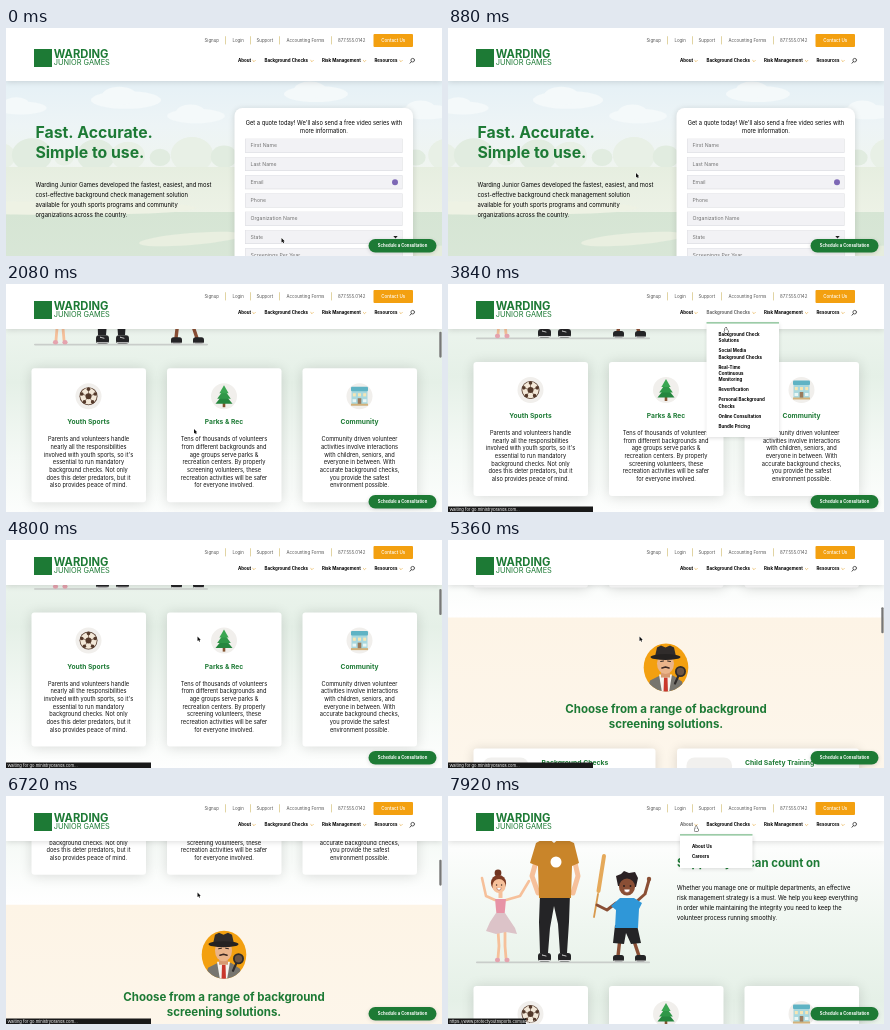
An HTML page with a canvas for the animation above (8 s loop, 436 px wide and 228 px high).

```html
<!DOCTYPE html>
<html lang="en">
<head>
<meta charset="utf-8">
<title>Page tour</title>
<style>
html, body { margin: 0; width: 100%; height: 100%; overflow: hidden; background: #fff; }
canvas { display: block; width: 436px; height: 228px; }
</style>
</head>
<body>
<canvas id="stage"></canvas>
<script>
const W = 436, H = 228, LOOP = 8000, STEP = 80;
const GREEN = '#1d7a35', ORANGE = '#f3a010', INK = '#000', SKIN = '#f6c09a', BROWN = '#8a4f35', BLACK = '#242426';
const canvas = document.getElementById('stage');
const c = canvas.getContext('2d');
const dpr = window.devicePixelRatio || 1;
canvas.width = W * dpr;
canvas.height = H * dpr;

// ---- drawing helpers ----
function fill(color, shadow) {
  c.save();
  if (shadow) {
    c.shadowColor = 'rgba(0,0,0,.14)';
    c.shadowBlur = shadow * dpr;
    c.shadowOffsetY = dpr;
  }
  c.fillStyle = color;
  c.fill();
  c.restore();
}
function box(x, y, w, h, color, r = 0, shadow = 0) {
  c.beginPath();
  c.roundRect(x, y, w, h, r);
  fill(color, shadow);
}
function oval(x, y, rx, ry, color, turn = 0) {
  c.beginPath();
  c.ellipse(x, y, rx, ry, turn, 0, 7);
  fill(color);
}
const disc = (x, y, r, color) => oval(x, y, r, r, color);
function trace(p) {
  c.beginPath();
  for (let i = 0; i < p.length; i += 2) c.lineTo(p[i], p[i + 1]);
}
function poly(color, ...p) {
  trace(p);
  c.closePath();
  fill(color);
}
function line(color, width, ...p) {
  trace(p);
  c.strokeStyle = color;
  c.lineWidth = width;
  c.lineCap = c.lineJoin = 'round';
  c.stroke();
}
function ring(x, y, r, color, width, from = 0, to = 7) {
  c.beginPath();
  c.arc(x, y, r, from, to);
  c.strokeStyle = color;
  c.lineWidth = width;
  c.stroke();
}
function grin(x, y, r) {
  c.beginPath();
  c.arc(x, y, r, 0, Math.PI);
  fill('#fff');
  ring(x, y, r, '#8d4030', 0.5, 0, Math.PI);
}
function text(s, x, y, size, color = INK, weight = 400, align = 'left') {
  c.font = `${weight} ${size}px Inter, sans-serif`;
  c.textAlign = align;
  c.fillStyle = color;
  c.fillText(s, x, y + size * 0.33);
}
function lines(s, x, y, step, size, color, weight, align) {
  s.split('|').forEach((row, i) => text(row, x, y + i * step, size, color, weight, align));
}
function fade(y0, y1, ...colors) {
  const g = c.createLinearGradient(0, y0, 0, y1);
  colors.forEach((k, i) => g.addColorStop(i / (colors.length - 1), k));
  return g;
}

// ---- timing helpers ----
const ease = (t, a, b) => {
  const u = Math.min(1, Math.max(0, (t - a) / (b - a)));
  return u * u * (3 - 2 * u);
};
const scrollAt = t => 420 * ease(t, 920, 2170) + 329 * ease(t, 4700, 6020) - 441 * ease(t, 6350, 7150);
const moves = [[100, 760, 188, 145], [2500, 3300, 278, 46], [4250, 4680, 191.5, 96.5], [7150, 7600, 248.2, 32.5]];
function cursorAt(t) {
  let x = 275.5, y = 210;
  for (const [a, b, nx, ny] of moves) {
    const u = ease(t, a, b);
    x += (nx - x) * u;
    y += (ny - y) * u;
  }
  return [x, y];
}

// ---- page sections, in page coordinates ----
function hero() {
  box(0, 0, W, 287, fade(45, 150, '#e4f0f6', '#edf4f6', '#f0f5ee'));
  for (const [x, y, r] of [[15, 80, 16], [120, 72, 22], [190, 88, 18], [310, 66, 20], [420, 84, 18]]) {
    oval(x, y, r * 1.6, r * 0.4, '#f4f9fa');
    oval(x - r * 0.3, y - 4, r * 0.8, r * 0.42, '#f4f9fa');
  }
  for (let i = 0; i < 15; i++) {
    const x = i * 32 - 6, r = 13 + 5 * Math.sin(i * 2.3);
    oval(x, 132 - r * 0.3, r * 1.2, r, i % 2 ? '#e1ece0' : '#e8f0e6');
  }
  box(0, 139, W, 46, fade(139, 185, '#e6eee0', '#edf2e6'));
  box(0, 184, W, 103, fade(184, 287, '#d6e5d4', '#dbe8da'));
  oval(60, 180, 130, 7, '#eef2e4');
  oval(185, 211, 52, 6, '#e9efe0', -0.08);
  oval(400, 226, 90, 9, '#e6eddd');
  oval(20, 240, 110, 10, '#d2e3d1');
  c.beginPath();
  c.moveTo(0, 267);
  c.bezierCurveTo(90, 276, 170, 277, 240, 272);
  c.bezierCurveTo(310, 264, 380, 268, W, 260);
  c.lineTo(W, 287);
  c.lineTo(0, 287);
  fill('#f3ede0');

  lines('Fast. Accurate.|Simple to use.', 29.5, 105.2, 20, 15.8, GREEN, 700);
  lines('Warding Junior Games developed the fastest, easiest, and most|cost-effective background check management solution|available for youth sports programs and community|organizations across the country.', 29.5, 157.2, 9.8, 5.85);

  box(228.5, 80, 178.5, 181, '#fff', 8, 6);
  lines("Get a quote today! We'll also send a free video series with|more information.", 318, 95.5, 8, 5.73, INK, 400, 'center');
  ['First Name', 'Last Name', 'Email', 'Phone', 'Organization Name', 'State', 'Screenings Per Year'].forEach((s, i) => {
    const y = 117.7 + i * 18.25;
    box(239, y - 7, 157.5, 14, '#d6d7dc');
    box(239.4, y - 6.6, 156.7, 13.2, '#f2f2f5');
    text(s, 244.5, y, 5.2, '#757575');
  });
  disc(389, 154.2, 3, '#7d68b5');
  poly('#222', 387.3, 208, 391.7, 208, 389.5, 210.6);
  box(239, 238.5, 27, 13, ORANGE, 1);
  text('Submit', 252.5, 245, 5.2, '#fff', 400, 'center');
}

function dancer() {
  line(SKIN, 2.8, 50, 134, 51, 150, 50, 162);
  line(SKIN, 2.8, 57, 134, 57, 150, 58, 162);
  oval(49.5, 164, 2.6, 2.2, '#e5a3ae');
  oval(59, 164, 2.6, 2.2, '#e5a3ae');
  line(SKIN, 2.6, 47, 104, 38, 100, 34, 82);
  line(SKIN, 2.6, 58, 104, 72, 100, 81, 85);
  disc(50, 77, 3.4, '#6f3420');
  oval(50.5, 87, 7.6, 8, '#7d3b24');
  oval(51, 90, 6.6, 7, SKIN);
  grin(51, 92, 2.2);
  disc(48.6, 89, 0.7, '#3b2b26');
  disc(53.6, 89, 0.7, '#3b2b26');
  box(50.5, 96, 4, 6, SKIN);
  poly('#e793a6', 47, 103, 58, 103, 56.5, 119, 48.5, 119);
  poly('#dcc3c8', 48, 117, 57, 117, 67, 132, 69, 138, 58, 136, 48, 138, 38, 135, 42, 126);
}

function coach() {
  line(SKIN, 5, 89, 62, 84, 80, 90, 97);
  line(SKIN, 5, 126, 62, 130, 80, 125, 97);
  poly(BLACK, 92, 98, 122, 98, 121, 126, 119, 157, 112, 157, 110, 128, 106, 110, 102, 132, 100, 157, 92, 157, 91, 126);
  for (const x of [90, 110]) {
    box(x, 157, 13, 8.5, BLACK, 3);
    line('#eee', 1, x + 1, 164.6, x + 12, 164.6);
    line('#eee', 0.8, x + 4, 159, x + 8, 160);
  }
  box(100, 34, 12, 12, '#e6a67f');
  poly('#c9852a', 97, 42, 115, 42, 126, 47, 131, 67, 124, 70, 123, 102, 91, 102, 90, 70, 82, 67, 88, 47);
  poly('#fff', 100, 42, 112, 42, 106, 47);
  disc(108, 66, 5.5, '#fff');
  oval(107, 22, 11.3, 15.5, SKIN);
  disc(95.5, 24, 2.6, SKIN);
  disc(118.5, 23, 2.6, SKIN);
  poly('#74371a', 95.5, 22, 94, 11, 97, 6, 104, 4, 114, 5, 119, 10, 119, 19, 116, 14, 108, 14, 100, 12, 97.5, 15);
  disc(103, 21, 1.2, '#3b2520');
  disc(112, 21, 1.2, '#3b2520');
  line('#74371a', 0.9, 101, 18, 105, 17.5);
  line('#74371a', 0.9, 110, 17.5, 114, 18);
  grin(108, 27, 4.6);
}

function batter() {
  line('#d89a4e', 1.8, 146, 121, 150, 98);
  line('#e5a95a', 4, 150.5, 95, 156, 60);
  line(BROWN, 3, 168, 107, 159, 114, 149, 109);
  line(BROWN, 3, 188, 106, 197, 98, 201, 84);
  disc(201, 83, 2.2, BROWN);
  line(BROWN, 3.4, 172, 142, 170, 160);
  line(BROWN, 3.4, 185, 142, 191, 160);
  for (const x of [165, 187]) {
    box(x, 159, 11, 6.5, BLACK, 2.5);
    line('#eee', 0.9, x + 1, 165, x + 10, 165);
  }
  poly(BLACK, 167, 129, 189, 129, 193, 147, 183, 148, 178, 137, 176, 148, 165, 147);
  poly('#2f97d8', 172, 102, 186, 102, 194, 107, 191, 113, 190, 132, 167, 132, 168, 114, 163, 110);
  poly('#2b2224', 170, 90, 168, 80, 173, 78, 176, 75, 181, 77, 187, 76, 190, 82, 188, 91);
  oval(179, 91, 8, 8.6, BROWN);
  disc(176, 90, 0.9, '#221a1a');
  disc(182.5, 90, 0.9, '#221a1a');
  grin(179, 93.5, 3);
}

function ball(x, y) {
  disc(x, y, 9, '#54392a');
  disc(x, y, 8.2, '#f3e8d8');
  disc(x, y, 3, '#54392a');
  for (let i = 0; i < 5; i++) {
    const a = i * 1.2566 - 1.57, u = Math.cos(a), v = Math.sin(a);
    line('#54392a', 0.6, x, y, x + u * 7, y + v * 7);
    disc(x + u * 7, y + v * 7, 1.8, '#54392a');
  }
}
function tree(x, y) {
  box(x - 1.3, y + 6, 2.6, 5, '#83532f');
  poly('#25863e', x, y - 3, x + 8.5, y + 7.5, x - 8.5, y + 7.5);
  poly('#2f9748', x, y - 7, x + 6.8, y + 2.5, x - 6.8, y + 2.5);
  poly('#3aa652', x, y - 11, x + 4.6, y - 3, x - 4.6, y - 3);
}
function hall(x, y) {
  box(x - 8, y - 7, 16, 16, '#a9d8de', 1);
  box(x - 8.5, y - 9.5, 17, 4.5, '#5fb3c4', 1);
  box(x - 8.5, y + 7.5, 17, 2, '#d3b27a');
  for (const d of [-5.2, 0, 5.2]) box(x + d - 1.5, y - 3, 3, 3.2, '#f6e6b4');
  box(x - 1.8, y + 2, 3.6, 5.6, '#9a7a5c');
  box(x - 7, y + 3, 3.6, 3, '#e9f6f5');
  box(x + 3.4, y + 3, 3.6, 3, '#e9f6f5');
}

function support() {
  box(0, 287, W, 375, fade(287, 662, '#fff', '#fcfdfc', '#eff6f0', '#e5f0e7', '#f4f9f5', '#fff'));
  c.save();
  c.translate(0, 308);
  box(28, 165.6, 174, 1.6, '#c9cdca', 0.8);
  dancer();
  coach();
  batter();
  c.restore();
  text('Support you can count on', 229, 375, 11.4, GREEN, 700);
  lines('Whether you manage one or multiple departments, an effective|risk management strategy is a must. We help you keep everything|in order while maintaining the integrity you need to keep the|volunteer process running smoothly.', 229, 400.5, 9.7, 5.82);
  const cards = [
    ['Youth Sports', ball, "Parents and volunteers handle|nearly all the responsibilities|involved with youth sports, so it's|essential to run mandatory|background checks. Not only|does this deter predators, but it|also provides peace of mind."],
    ['Parks & Rec', tree, 'Tens of thousands of volunteers|from different backgrounds and|age groups serve parks &|recreation centers. By properly|screening volunteers, these|recreation activities will be safer|for everyone involved.'],
    ['Community', hall, 'Community driven volunteer|activities involve interactions|with children, seniors, and|everyone in between. With|accurate background checks,|you provide the safest|environment possible.']
  ];
  cards.forEach(([title, icon, body], i) => {
    const x = 25.5 + i * 135.5, mid = x + 57;
    box(x, 498, 114.5, 134, '#fff', 3, 13);
    disc(mid, 526, 13, '#f1efec');
    icon(mid, 526);
    text(title, mid, 552, 6.7, GREEN, 700, 'center');
    lines(body, mid, 569.3, 7.65, 5.68, '#111', 400, 'center');
  });
}

function detective() {
  c.save();
  c.beginPath();
  c.ellipse(218, 712, 22.3, 24, 0, 0, 7);
  fill(ORANGE);
  c.clip();
  poly('#77756f', 198, 740, 202, 725, 212, 720, 225, 720, 234, 726, 238, 740);
  poly('#f5f3ee', 211, 719, 224, 719, 221, 737, 214, 737);
  poly('#c9372c', 216, 722, 219.5, 722, 220, 738, 215.5, 738);
  box(213, 714, 9, 8, '#d79a70');
  oval(217.5, 708, 8.5, 10.5, '#eab48a');
  line('#2b2320', 1, 212.5, 706, 215.5, 705.5);
  line('#2b2320', 1, 219.5, 705.5, 222.5, 706);
  line('#3a2823', 1.6, 214, 712.5, 217.5, 711.5, 221, 712.5);
  poly('#302c2b', 207, 701, 209, 692, 213, 690, 217.5, 692, 222, 690, 226, 692, 228, 701);
  oval(217.5, 701.5, 15, 3, '#252221');
  c.restore();
  line('#302c2b', 2.2, 231, 719, 227, 728);
  disc(232.5, 716, 5.5, '#302c2b');
  disc(232.5, 716, 3.7, '#6b5544');
}
function magnifier(x, y) {
  box(x - 11, y - 17, 24, 31, '#fff', 1);
  for (let i = 0; i < 5; i++) line('#c6c6c6', 1.2, x - 7, y - 11 + i * 5, x + 8, y - 11 + i * 5);
  line('#2f3a38', 4, x + 8, y + 7, x + 20, y + 15);
  disc(x - 2, y - 3, 12, 'rgba(226,236,234,.85)');
  ring(x - 2, y - 3, 12, '#2f3a38', 2.2);
  for (let i = 0; i < 3; i++) line('#aebbb6', 1.3, x - 8, y - 8 + i * 5, x + 4, y - 8 + i * 5);
}
function training(x, y) {
  box(x - 10, y - 12, 17, 16, GREEN, 1);
  poly(GREEN, x - 4, y + 3, x + 2, y + 3, x - 1, y + 8);
  text('i', x - 1.5, y - 4, 13, '#fff', 700, 'center');
  disc(x - 11, y + 4, 5.2, ORANGE);
  text('?', x - 11, y + 4, 7, '#fff', 700, 'center');
  box(x + 2, y - 0.5, 10, 8.5, ORANGE, 3);
  poly(ORANGE, x + 4, y + 7, x + 9, y + 7, x + 6, y + 10);
  text('★', x + 7, y + 4, 5.5, '#fff', 700, 'center');
}
function clock(x, y) {
  disc(x, y, 14.5, '#fff');
  disc(x, y, 13.3, '#1f8440');
  line('#fff', 1.8, x, y - 8, x, y, x + 5.5, y + 5);
}
function dots(x, y) {
  for (const u of [-7, 7.5]) for (const v of [-7, 8]) disc(x + u, y + v, 6.3, '#b7b5b2');
}

function solutions() {
  box(0, 662, W, 400, fade(662, 960, '#fdf4e6', '#fdf6eb', '#fefaf4'));
  detective();
  lines('Choose from a range of background|screening solutions.', 218, 754, 15, 11.5, GREEN, 700, 'center');
  const cards = [
    ['Background Checks', magnifier, 'We provide accurate background|screenings for youth sports|organizations, parks and recreation|centers, community programs,|volunteers, and employment.'],
    ['Child Safety Training', training, 'Go beyond background checks and|educate coaches, staff, and|volunteers with our online training for|child abuse prevention.'],
    ['Real-Time Monitoring', clock, 'Access an FCRA-compliant, ongoing|monitoring tool that allows|organizations to monitor their|background checked employees and|volunteers in real-time.'],
    ['Social Media Screening', dots, 'Screen social media and online|behaviors of volunteers and|employees to ensure you get the full|picture of the people working within|your organization.']
  ];
  cards.forEach(([title, icon, body], i) => {
    const x = 25.5 + (i % 2) * 203.5, y = 793 + (i >> 1) * 104;
    box(x, y, 182, 86, '#fff', 3, 12);
    box(x + 9.5, y + 9, 45.5, 45.5, '#f1f0ee', 8);
    icon(x + 32, y + 32);
    text(title, x + 68, y + 14, 6.8, GREEN, 700);
    lines(body, x + 68, y + 26, 7.7, 5.72, '#111');
    box(x + 68, y + 65, 39.5, 13, ORANGE);
    text('Learn More', x + 87.7, y + 71.5, 4.4, '#fff', 700, 'center');
  });
}

// ---- fixed parts ----
const nav = [['About', 232, 248], ['Background Checks', 258.5, 306], ['Risk Management', 316, 358.5], ['Resources', 368.5, 395]];

function header(p, active) {
  box(0, -10, W, 63 - 8 * p, '#fff', 0, 6);
  const up = -4 * p;
  box(28, 21 + up, 18, 18, GREEN);
  text('WARDING', 47.8, 26 + up, 11.2, GREEN, 700);
  text('JUNIOR GAMES', 47.8, 35 + up, 7.4, GREEN, 400);
  [['Signup', 198.5], ['Login', 226.5], ['Support', 250.5], ['Accounting Forms', 280.5], ['877.555.0142', 332]]
    .forEach(([s, x]) => text(s, x, 12.3, 4.4, '#555'));
  for (const x of [219.5, 244.5, 273.5, 325.5]) line('#d5c27c', 0.7, x, 8.5, x, 16);
  box(367.5, 6, 39.5, 13, ORANGE, 1);
  text('Contact Us', 387.2, 12.5, 4.5, '#fff', 500, 'center');
  const y = 33 + up;
  nav.forEach(([s, x, a], i) => {
    text(s, x, y, 4.45, i === active ? '#666' : '#000', 700);
    line('#e9b04b', 0.7, a - 1.3, y - 0.6, a, y + 0.7, a + 1.3, y - 0.6);
  });
  ring(406.7, y - 0.8, 1.8, '#222', 0.7);
  line('#222', 0.8, 405.3, y + 0.7, 404, y + 2.2);
}

function menu(x, h, alpha, items) {
  if (alpha <= 0) return;
  c.globalAlpha = alpha;
  box(x, 38.5, 72.5, h, '#fff', 0, 4);
  box(x, 38.2, 72.5, 1.4, '#7dbb8b');
  let y = 50.4;
  for (const s of items) {
    lines(s, x + 12, y, 6.4, 4.45, '#000', 700);
    y += 10 + 6.4 * (s.split('|').length - 1);
  }
  c.globalAlpha = 1;
}

function status(s, w) {
  box(0, 222.5, w, 6, '#191919');
  text(s, 1.5, 225.7, 4.1, '#fff', 400);
}

function pointer(x, y, hand) {
  c.save();
  c.translate(x, y);
  if (hand) {
    c.beginPath();
    c.roundRect(-0.9, -2.4, 1.6, 4, 0.8);
    c.roundRect(-1.7, 0, 3.8, 3, 1);
    c.strokeStyle = '#111';
    c.lineWidth = 1;
    c.stroke();
    fill('#fff');
  } else {
    c.beginPath();
    [[0, 0], [0, 4.6], [1.1, 3.7], [1.8, 5.2], [2.6, 4.8], [1.9, 3.4], [3.2, 3.3]].forEach(q => c.lineTo(...q));
    c.closePath();
    c.strokeStyle = '#fff';
    c.lineWidth = 0.8;
    c.stroke();
    fill('#111');
  }
  c.restore();
}

function draw(t) {
  const s = scrollAt(t);
  c.setTransform(dpr, 0, 0, dpr, 0, 0);
  box(0, 0, W, H, '#fff');
  c.save();
  c.translate(0, -s);
  hero();
  support();
  solutions();
  c.restore();

  const checks = ease(t, 3120, 3320) - ease(t, 4340, 4540);
  const about = ease(t, 7440, 7640);
  header(ease(t, 1250, 1650), about > 0 ? 0 : checks > 0 ? 1 : -1);
  menu(258.5, 114.5, checks, ['Background Check|Solutions', 'Social Media|Background Checks', 'Real-Time|Continuous|Monitoring', 'Reverification', 'Personal Background|Checks', 'Online Consultation', 'Bundle Pricing']);
  menu(232, 33.5, about, ['About Us', 'Careers']);

  box(362.5, 211, 68, 13.5, GREEN, 6.75, 4);
  text('Schedule a Consultation', 396.5, 217.7, 4.18, '#fff', 700, 'center');

  const bar = Math.max(ease(t, 900, 1000) - ease(t, 2600, 2850), ease(t, 4700, 4800) - ease(t, 7500, 7750));
  if (bar > 0) {
    c.globalAlpha = bar;
    box(433.3, 0.3 + s * 0.1145, 2.3, 26, '#777', 1.1);
    c.globalAlpha = 1;
  }
  if (t >= 3360 && t < 7040) status('Waiting for go.ministrybrands.com...', 145);
  else if (t >= 7520) status('https://www.protectyouthsports.com/about/', 78);
  pointer(...cursorAt(t), checks > 0.3 || about > 0.3);
}

function tick() {
  draw(Math.floor(performance.now() % LOOP / STEP) * STEP);
  requestAnimationFrame(tick);
}
tick();
</script>
</body>
</html>
```
